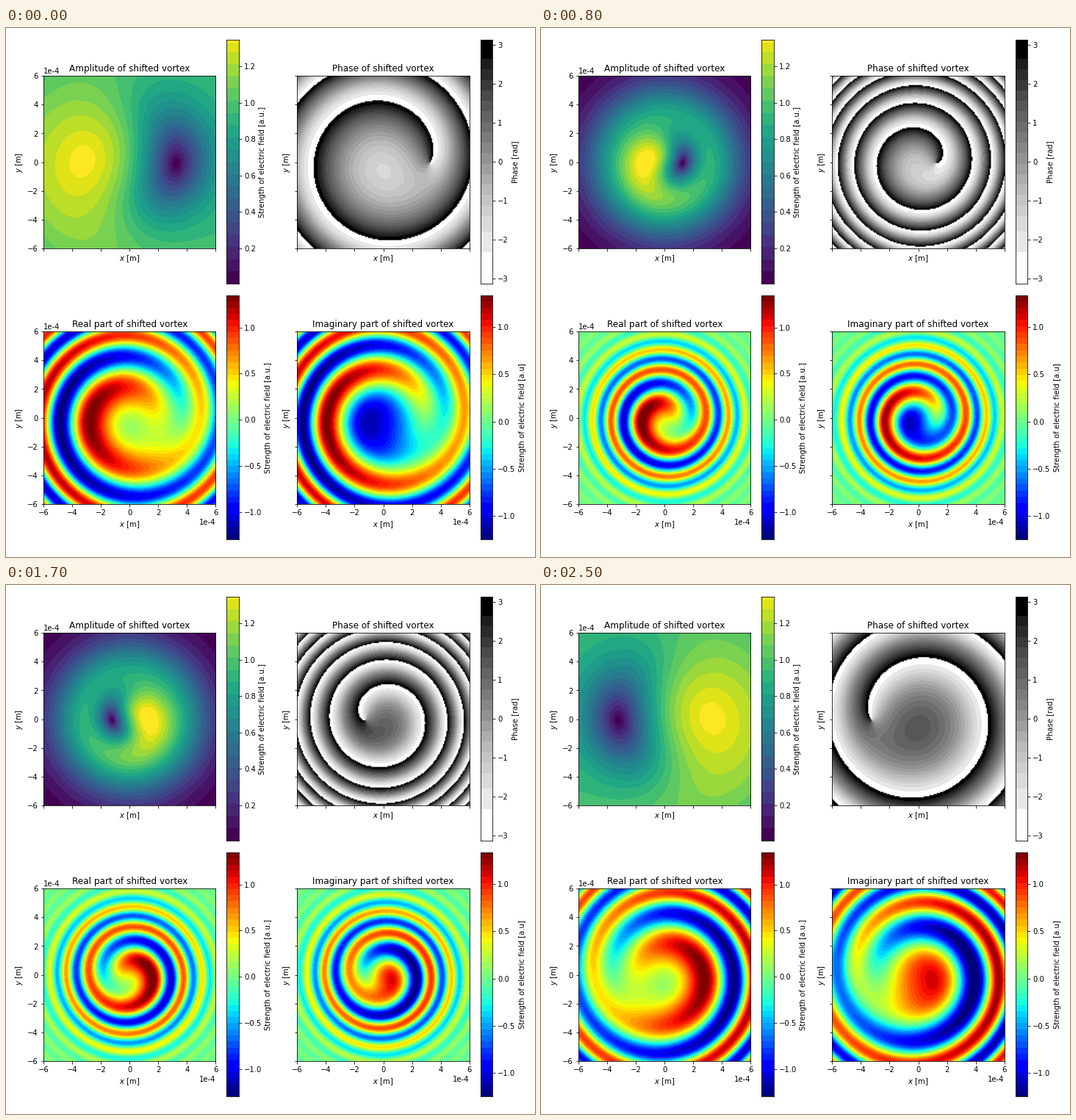
Recreate the animation shown at these times as a matplotlib script. Size 720x720 px, loop 2.55 s.

```python
import numpy as np
import matplotlib.pyplot as plt
from matplotlib.animation import FuncAnimation
from matplotlib.colors import BoundaryNorm, ListedColormap

SIZE = 720
FRAMES = 51
WAVELENGTH = 632.8e-9
K = 2 * np.pi / WAVELENGTH
HALF = 6e-4      # half width of the shown area in metres
GRID = 160

plt.rcParams.update({"font.family": "DejaVu Sans", "font.size": 10})
fig = plt.figure(figsize=(10, 10), dpi=72, facecolor="white")

line = np.linspace(-HALF, HALF, GRID)
X, Y = np.meshgrid(line, line)
R2 = X**2 + Y**2


def beam(z, waist):
    """Beam radius, wavefront curvature and Gouy phase at distance z."""
    zr = np.pi * waist**2 / WAVELENGTH
    return waist * np.hypot(1, z / zr), z / (z**2 + zr**2), np.arctan(z / zr)


def field(z):
    """Vortex mode plus a plain Gaussian, each with a peak of one."""
    w, c, gouy = beam(z, 50e-6)
    vortex = np.sqrt(2 * np.e) / w * -1j * (X - 1j * Y)
    vortex = vortex * np.exp(-R2 / w**2 + 1j * (2 * gouy - K * R2 * c / 2))
    w, c, gouy = beam(z, 100e-6)
    return vortex + np.exp(-R2 / w**2 + 1j * (gouy - K * R2 * c / 2))


def pixel_axes(left, top, right, bottom):
    return fig.add_axes([left / SIZE, 1 - bottom / SIZE,
                         (right - left) / SIZE, (bottom - top) / SIZE])


def make_panel(col, row, title, unit, edges, colours, ticks):
    dx, dy = 345.3 * col, 348 * row
    cmap = ListedColormap(colours)
    norm = BoundaryNorm(edges, len(colours))

    ax = pixel_axes(51, 65.4 + dy, 285.4, 299.7 + dy) if col == 0 else \
        pixel_axes(51 + dx, 65.4 + dy, 285.4 + dx, 299.7 + dy)
    edge = 6 + 6 / (GRID - 1)
    image = ax.imshow(np.zeros((GRID, GRID)), cmap=cmap, norm=norm,
                      origin="lower", aspect="auto",
                      extent=(-edge, edge, -edge, edge),
                      interpolation="bilinear", interpolation_stage="data")
    ax.set(xlim=(-6, 6), ylim=(-6, 6), title=title,
           xlabel="$x$ [m]", ylabel="$y$ [m]",
           xticks=range(-6, 7, 2), yticks=range(-6, 7, 2))
    ax.tick_params(labelbottom=row == 1, labelleft=col == 0)

    if col == 0:
        fig.text(51 / SIZE, 1 - (62.4 + dy) / SIZE, "1e-4", va="baseline")
    if row == 1:
        fig.text((285.4 + dx) / SIZE, 1 - 676.5 / SIZE, "1e-4",
                 ha="right", va="baseline")

    bar = pixel_axes(300.4 + dx, 16 + dy, 317 + dx, 348 + dy)
    middles = (edges[:-1] + edges[1:]) / 2
    bar.pcolormesh([0, 1], edges, middles[:, None], cmap=cmap, norm=norm)
    bar.set(xlim=(0, 1), ylim=(edges[0], edges[-1]), xticks=[], yticks=ticks)
    bar.yaxis.tick_right()
    bar.yaxis.set_label_position("right")
    bar.set_ylabel(unit)
    return image


def jet_bands(low, high, count=40):
    return np.linspace(low, high, count + 1), plt.cm.jet(np.linspace(0, 1, count))


amp_edges = np.sort(np.append(np.linspace(0.0065, 1.346, 21), 1.328))
amp_colours = plt.cm.viridis(np.linspace(0, 1, len(amp_edges) - 1))

phase_edges = np.concatenate(([-np.pi, -2.33, -1.8],
                              np.arange(-1.4, 2.75, 0.27), [np.pi]))
phase_mid = (phase_edges[:-1] + phase_edges[1:]) / 2
phase_colours = plt.cm.Greys((phase_mid + np.pi) / (2 * np.pi))
phase_colours[0, :3] = 1
phase_colours[-1, :3] = 0

halves = np.arange(-1, 1.1, 0.5)
STRENGTH = "Strength of electric field [a.u.]"
panels = [
    (make_panel(0, 0, "Amplitude of shifted vortex", STRENGTH,
                amp_edges, amp_colours, np.arange(1, 7) / 5), np.abs),
    (make_panel(1, 0, "Phase of shifted vortex", "Phase [rad]",
                phase_edges, phase_colours, range(-3, 4)), np.angle),
    (make_panel(0, 1, "Real part of shifted vortex", STRENGTH,
                *jet_bands(-1.294, 1.346), halves), np.real),
    (make_panel(1, 1, "Imaginary part of shifted vortex",
                "Strength of electric field [a.u]",
                *jet_bands(-1.249, 1.337), halves), np.imag),
]


def update(i):
    u = field((i - 25) * 0.01)
    for image, part in panels:
        image.set_data(part(u))
    return [image for image, _ in panels]


anim = FuncAnimation(fig, update, frames=FRAMES, interval=50,
                     repeat=True, repeat_delay=0, blit=False)
plt.show()
```
